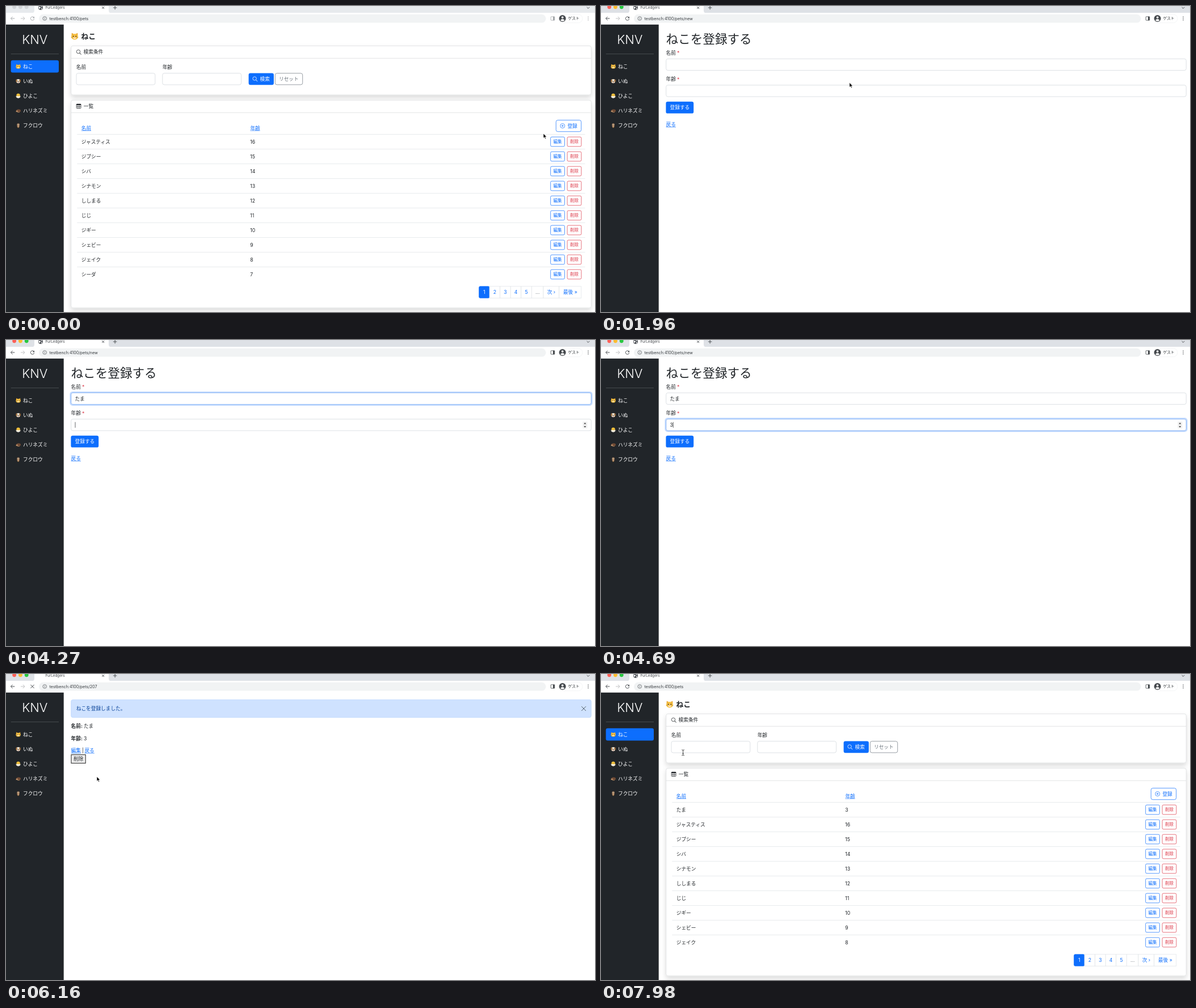
An HTML page that plays this animation: 1038 by 540 pixels, repeating every 8 s.

```html
<!DOCTYPE html>
<html lang="ja">
<head>
<meta charset="utf-8">
<title>Pet list</title>
<style>
html, body { margin: 0; width: 100%; height: 100%; overflow: hidden; background: #fff; }
svg { display: block; width: 1038px; height: 540px; }
text { font-family: Inter, "Noto Sans CJK JP", "Noto Sans CJK", sans-serif; white-space: pre; }
</style>
</head>
<body>
<svg id="stage" viewBox="0 0 1038 540"></svg>
<script>
const BLUE = '#0d6efd', RED = '#dc3545', INK = '#212529', GREY = '#6c757d';
const HOST = 'testbench:4100/pets';
const LOOP = 8000, STEP = 70, FONT = 8.67;

// Drawing helpers; text is placed by its left edge and vertical centre.
const text = (x, cy, s, { size = FONT, fill = INK, weight = 400, anchor = 'start', more = '' } = {}) =>
  `<text x="${x}" y="${cy + size * 0.37}" font-size="${size}" fill="${fill}" font-weight="${weight}" text-anchor="${anchor}" ${more}>${s}</text>`;
const rect = (x, y, w, h, fill = 'none', stroke = 'none', r = 0, more = '') =>
  `<rect x="${x}" y="${y}" width="${w}" height="${h}" fill="${fill}" stroke="${stroke}" rx="${r}" ${more}/>`;
const line = (d, stroke, width = 1, more = '') =>
  `<path d="${d}" fill="none" stroke="${stroke}" stroke-width="${width}" ${more}/>`;
const dot = (x, y, r, fill, more = '') => `<circle cx="${x}" cy="${y}" r="${r}" fill="${fill}" ${more}/>`;
const group = (id, body) => `<g id="${id}">${body}</g>`;
const at = (x, y, scale, body) => `<g transform="translate(${x} ${y}) scale(${scale})">${body}</g>`;
const link = (x, cy, s) => text(x, cy, s, { fill: BLUE }) +
  line(`M${x} ${cy + 4.6}h${s.length * FONT}`, BLUE, 0.7);
const field = (x, y, w) => rect(x, y, w, 20.4, '#fff', '#ced4da', 3.2, 'stroke-width=".7"');
const ring = (id, x, y, w, h, alpha) => group(id,
  rect(x - 1.1, y - 1.1, w + 2.2, h + 2.2, 'none', BLUE, 4, `stroke-width="2.2" stroke-opacity="${alpha}"`));
const fieldRing = (id, y) => group(id,
  rect(114.7, y, 916.6, 20.4, 'none', '#86b7fe', 3.2, 'stroke-width=".8"') +
  rect(113.4, y - 1.3, 919.2, 23, 'none', BLUE, 4, 'stroke-width="2" stroke-opacity=".25"'));

// Small animals, drawn around the origin about ten units wide.
const eyes = (x, y, r = 0.6) => dot(-x, y, r, '#3a2a1c') + dot(x, y, r, '#3a2a1c');
const cat =
  '<path d="M-4.6 0L-4.3-5L-1.5-3.3H1.5L4.3-5L4.6 0Z" fill="#e9a52c"/>' +
  '<ellipse cy=".7" rx="5" ry="4.2" fill="#f8c244"/>' + eyes(2, 0, 0.75) +
  '<ellipse cy="2.4" rx="2" ry="1.4" fill="#fff0c8"/>' + dot(0, 1.7, 0.6, '#d9776a') +
  line('M-5.3 1.6l2 .4M5.3 1.6l-2 .4', '#7d6030', 0.4);
const dog =
  '<ellipse rx="4.3" ry="4.5" fill="#f3ead9"/>' +
  '<ellipse cx="-3.7" cy="-.8" rx="1.4" ry="3.2" fill="#a5713d"/><ellipse cx="3.7" cy="-.8" rx="1.4" ry="3.2" fill="#a5713d"/>' +
  eyes(1.7, -0.6, 0.7) + '<ellipse cy="1.4" rx="1.2" ry=".9" fill="#33261e"/>' + dot(0, 3, 0.8, '#d9655c');
const chick =
  '<circle cy="-1" r="3.9" fill="#fbca3d"/><path d="M-5 0l1.6 1.2L-1.7 0L0 1.2L1.7 0L3.4 1.2L5 0Q5 5 0 5T-5 0Z" fill="#f3eee0"/>' +
  eyes(1.6, -1.8) + '<path d="M-1-.9H1L0 .3Z" fill="#ee8429"/>';
const hedgehog =
  '<ellipse cx=".6" cy=".3" rx="4.8" ry="3.3" fill="#6f4b35"/><ellipse cx="-3" cy="1.4" rx="2.2" ry="1.6" fill="#c99b72"/>' +
  dot(-4.9, 1.4, 0.6, '#1c1513') + dot(-3, 0.9, 0.4, '#1c1513') + line('M-2 3.6h5', '#c99b72', 0.8);
const owl =
  '<ellipse rx="3" ry="4.8" fill="#7b5a43"/><ellipse cy="1.6" rx="1.8" ry="2.6" fill="#bf9b79"/>' +
  dot(-1.2, -2, 1.1, '#ead9bd') + dot(1.2, -2, 1.1, '#ead9bd') + eyes(1.2, -2, 0.5) +
  '<path d="M-.5-1.2h1L0 0Z" fill="#e3a13a"/>' + line('M-1.5 4.8h3', '#d69a46', 0.7);

const searchIcon = (x, y, color) =>
  line(`M${x + 1.7} ${y + 1.6}l2.7 2.7`, color, 1) +
  `<circle cx="${x - 0.7}" cy="${y - 0.8}" r="3.2" fill="none" stroke="${color}" stroke-width=".75"/>`;
const plusIcon = color =>
  `<circle cx="980.8" cy="211.5" r="4" fill="none" stroke="${color}" stroke-width=".7"/>` +
  line('M978.8 211.5h4M980.8 209.5v4', color, 0.7);

function browser() {
  const lights = colors => colors.map((c, i) => dot(14.6 + i * 10.8, 1.8, 3.4, c)).join('');
  const nav = color => line('M15.3 22h-6.8M11.6 18.8l-3.2 3.2l3.2 3.2', color, 0.95) +
    rect(960.2, 18.8, 6.6, 6.4, 'none', color, 0.6, 'stroke-width=".8"') + rect(964, 18.8, 2.8, 6.4, color) +
    [19.2, 22, 24.8].map(y => dot(1026, y, 0.75, color)).join('');
  const reload = color => line('M49.3 20.4a3.2 3.2 0 1 0 .4 2.4', color, 0.95) +
    `<path d="M50 18.4v3.1h-3.1Z" fill="${color}"/>`;
  return rect(0, 0, 1038, 13, '#dee1e6') +
    group('idle', rect(0, 0, 1038, 13, '#e7eaed') + lights(['#d2d4d7', '#d2d4d7', '#d2d4d7'])) +
    group('awake', lights(['#fe5f57', '#febc2e', '#28c840'])) +
    '<path d="M46 12.5Q50 12 50 8V0H181V8Q181 12 185 12.5Z" fill="#fff"/>' + rect(0, 12, 1038, 20.5, '#fff') +
    group('favicon', dot(61, 3, 4, '#4b4f54') +
      '<path d="M58 1.2l2.2.2 1 1.3-1.6 1.2-.3 2L57.7 3.6ZM62 0l2 1.7-1.2.6-1.2-1ZM62.2 3.8l2 .2-1.2 2.1-1 .2Z" fill="#fff"/>') +
    text(69.5, 3, 'FurLedgers', { size: 6.3, fill: '#45494d' }) +
    line('M169.3 1.2l3.8 3.8M173.1 1.2l-3.8 3.8', '#45494d', 0.9) +
    line('M188.8 3h6.6M192.1 -.3v6.6', '#45494d', 0.95) +
    line('M1023.6 2l2.4 2.4l2.4-2.4', '#45494d', 0.95) +
    rect(58, 14.8, 893.5, 14.8, '#f1f3f4', 'none', 7.4) +
    line('M26 22h6.8M29.8 18.8l3.2 3.2l-3.2 3.2', '#babcbe', 0.9) +
    group('navIdle', nav('#a4a7aa') + reload('#a4a7aa')) + group('navAwake', nav('#45494d')) +
    group('reload', reload('#45494d')) +
    group('stop', line('M43.4 18.9l6.2 6.2M49.6 18.9l-6.2 6.2', '#45494d', 1)) +
    '<circle cx="68.2" cy="22" r="3.3" fill="none" stroke="#55595d" stroke-width=".75"/>' +
    line('M68.2 21.6v2.1M68.2 20v.8', '#55595d', 0.8) +
    text(76.5, 22, '', { size: 7.1, fill: '#33373b', more: 'id="url"' }) +
    rect(973.5, 14.8, 42.5, 14.8, '#fff', '#eceef0', 7.4, 'stroke-width=".6"') +
    dot(980.7, 22, 6, '#45494d') + dot(980.7, 20.1, 1.9, '#fff') +
    '<path d="M976.9 25.2q3.8-4.2 7.6 0q-3.8 3-7.6 0Z" fill="#fff"/>' +
    text(990.5, 22, 'ゲスト', { size: 6.7, fill: '#33373b' });
}

function sidebar() {
  const items = [[cat, 'ねこ'], [dog, 'いぬ'], [chick, 'ひよこ'], [hedgehog, 'ハリネズミ'], [owl, 'フクロウ']];
  return rect(0, 32.5, 101.7, 507.5, INK) +
    text(50.7, 59, 'KNV', { size: 21.7, fill: '#fff', weight: 300, anchor: 'middle' }) +
    line('M8.7 84.6H93', '#585c60', 0.7) +
    group('current', rect(8.6, 95.8, 84.4, 21.7, BLUE, 'none', 3.2)) +
    items.map(([art, name], i) => at(21.6, 106.6 + i * 26, 0.82, art) +
      text(30, 106.4 + i * 26, name, { fill: '#fff', weight: 500 })).join('');
}

const CATS = ['ジャスティス', 'ジプシー', 'シバ', 'シナモン', 'ししまる', 'じじ', 'ジギー', 'シェビー', 'ジェイク', 'シーダ']
  .map((name, i) => [name, 16 - i]);
const rows = list => list.map(([name, age], i) =>
  text(132.8, 239.5 + i * 26, name) + text(430.3, 239.5 + i * 26, age)).join('');

function listPage() {
  const card = (y, h, head) =>
    rect(114.7, y, 916.6, h, '#fff', '#d6d8da', 3.4, 'stroke-width=".7" filter="url(#shadow)"') +
    line(`M114.7 ${y + 22}h916.6`, '#d6d8da', 0.7) + head;
  const small = (x, y, s, color) => rect(x, y - 8.4, 24.8, 16.8, '#fff', color, 2.2, 'stroke-width=".7"') +
    text(x + 12.4, y, s, { size: 7.6, fill: color, anchor: 'middle' });
  const addButton = color => plusIcon(color) + text(989.4, 211.5, '登録', { fill: color, weight: 500 });

  const table = rect(124.2, 173, 7.8, 7.6, 'none', INK, 0.8, 'stroke-width=".75"') +
    rect(124.2, 173, 7.8, 2, INK) + line('M124.2 177.6h7.8M126.8 174v6.6M129.4 174v6.6', INK, 0.65);
  const lines = CATS.map((_, i) => line(`M125.3 ${226.5 + i * 26}H1020.5`, '#dee2e6', 0.7) +
    small(959.7, 239.5 + i * 26, '編集', BLUE) + small(989.1, 239.5 + i * 26, '削除', RED)).join('');

  const edges = [833.6, 852, 870.6, 889.2, 907.8, 926.3, 947, 974.8, 1013.8];
  const pages = ['1', '2', '3', '4', '5', '…', '次 ›', '最後 »'].map((s, i) => {
    const x = edges[i], w = edges[i + 1] - x, on = i === 0;
    return rect(x, 494.8, w, 20.5, on ? BLUE : '#fff', on ? BLUE : '#dee2e6', on ? 2 : 0, 'stroke-width=".7"') +
      text(x + w / 2, 505, s, { fill: on ? '#fff' : i === 5 ? GREY : BLUE, anchor: 'middle' });
  }).join('');

  return at(121, 53.5, 1.2, cat) + text(132.3, 53, 'ねこ', { size: 13, weight: 600 }) +
    card(70.3, 86.6, searchIcon(128.2, 81.4, INK) + text(136.6, 81.2, '検索条件')) +
    text(123.8, 107.5, '名前') + text(275.7, 107.5, '年齢') + field(124, 118.6, 138.8) + field(275.8, 118.6, 138.8) +
    rect(427.6, 118.4, 44.3, 20.8, BLUE, 'none', 3.2) + searchIcon(438.8, 128.8, '#fff') +
    text(447.6, 128.8, '検索', { fill: '#fff', weight: 500 }) +
    rect(474.3, 118.7, 48.4, 20.2, '#fff', GREY, 3.2, 'stroke-width=".7"') + text(481, 128.8, 'リセット', { fill: GREY }) +
    card(166.2, 366.6, table + text(136.8, 177.2, '一覧')) +
    link(132.8, 215.3, '名前') + link(430.4, 215.3, '年齢') +
    rect(969.3, 201.4, 44.4, 20.3, '#fff', BLUE, 3.2, 'stroke-width=".7"') + addButton(BLUE) +
    group('addHover', rect(969, 201.1, 45, 20.9, BLUE, 'none', 3.2) + addButton('#fff')) +
    ring('addRing', 969, 201.1, 45, 20.9, 0.5) +
    lines + group('rowsOld', rows(CATS)) + group('rowsNew', rows([['たま', 3], ...CATS.slice(0, 9)])) + pages;
}

function formPage() {
  const label = (y, s) => text(114.6, y, s) + text(134, y + 0.5, '*', { fill: RED });
  return text(114.5, 58.3, 'ねこを登録する', { size: 21.6 }) +
    label(82.4, '名前') + field(114.7, 93.2, 916.6) + fieldRing('nameRing', 93.2) + label(128.8, '年齢') +
    field(114.7, 139.6, 916.6) + fieldRing('ageRing', 139.6) +
    text(121.6, 103.4, '', { more: 'id="name"' }) + text(121.6, 149.8, '3', { more: 'id="age"' }) +
    group('compose', line('M121.8 108.4h17', INK, 0.7)) +
    group('spinner', rect(1016.4, 144.2, 8, 11.6, '#efefef') +
      '<path d="M1018.3 148.2h4l-2-2.4ZM1018.3 152h4l-2 2.4Z" fill="#444"/>') +
    line('M0 -5v10', INK, 0.7, 'id="caret"') +
    group('suggest', rect(116.5, 114, 69, 39, '#f6f6f6', '#c6c6c6', 3, 'stroke-width=".6"') +
      group('pick', rect(117.5, 116.5, 67, 16.5, '#1d66d6', 'none', 2)) +
      text(121.6, 125, 'たま', { more: 'id="first"' }) + text(121.6, 143, '玉')) +
    rect(114.4, 168.8, 48.8, 20.8, BLUE, 'none', 3.2) +
    group('saveHover', rect(114.4, 168.8, 48.8, 20.8, '#0b5ed7', 'none', 3.2)) + ring('saveRing', 114.4, 168.8, 48.8, 20.8, 0.5) +
    text(121.6, 179.1, '登録する', { fill: '#fff', weight: 500 }) + link(114.6, 209, '戻る');
}

const detailPage = () =>
  rect(114.7, 45.4, 916.6, 31.3, '#cfe2ff', '#b6d4fe', 3.2, 'stroke-width=".7"') +
  text(123.8, 61, 'ねこを登録しました。', { fill: '#084298' }) +
  line('M1014.2 57.2l7.8 7.8M1022 57.2l-7.8 7.8', '#53606f', 1) +
  text(114.6, 92, '名前:', { weight: 700 }) + text(137, 92, 'たま') +
  text(114.6, 113.8, '年齢:', { weight: 700 }) + text(137, 113.8, '3') +
  link(114.6, 135.2, '編集') + text(134, 135.2, '|') + link(138.4, 135.2, '戻る') +
  rect(115, 142.4, 25.2, 15, '#efefef', '#333', 0, 'stroke-width="1.1"') + text(119, 149.9, '削除');

const cursors =
  group('arrow', '<path d="M0 0V8.2L1.9 6.5L3.2 9.5L4.6 8.9L3.3 6H5.8Z" fill="#000" stroke="#fff" stroke-width=".7"/>') +
  group('beam', line('M-2.3 -5Q0 -5 0 -3.8Q0 -5 2.3 -5M0 -4V4M-2.3 5Q0 5 0 3.8Q0 5 2.3 5M-1.2 1.6h2.4', '#222', 0.8)) +
  group('hand', '<path d="M-1 1q0-1.2 .9-1.2t.9 1.2v3l4 .9q.9.3.7 1.4l-.8 4.3h-5.2l-3-4.1q-.5-1 .6-1.2l1.9 1.3Z" fill="#fff" stroke="#000" stroke-width=".7"/>');

document.getElementById('stage').innerHTML =
  '<defs><filter id="shadow" x="-5%" y="-10%" width="110%" height="130%">' +
  '<feDropShadow dx="0" dy="4.3" stdDeviation="4.3" flood-opacity=".15"/></filter></defs>' +
  group('list', listPage()) + group('form', formPage()) + group('detail', detailPage()) +
  sidebar() + browser() + group('pointer', cursors);

const el = {};
document.querySelectorAll('#stage [id]').forEach(e => { el[e.id] = e; });
const show = (id, on) => el[id].setAttribute('opacity', +on);
const write = (id, s) => { if (el[id].textContent !== s) el[id].textContent = s; };
const within = (t, a, b) => t >= a && t < b;
const ramp = (t, a, b) => Math.min(1, Math.max(0, (t - a) / (b - a)));
const smooth = u => u * u * (3 - 2 * u);

// Pointer stops: time, x, y.
const PATH = [
  [0, 947, 225], [420, 984, 217], [490, 984, 217], [840, 989, 212], [1470, 989, 212],
  [2170, 286, 114], [2240, 286, 114], [2520, 286, 109], [5110, 286, 109], [5460, 190, 189],
  [5670, 165, 184], [5810, 160, 181], [6720, 160, 181], [7350, 145.7, 147], [7490, 144, 133],
  [7560, 144.6, 137], [7770, 144.6, 137], [7840, 144.6, 138.8], [8000, 144.6, 138.8]
];
// What is typed from each time on.
const TYPED = [[0, ''], [3220, 't'], [3290, 'た'], [3430, 'たm'], [3500, 'たま']];

function pointer(t) {
  const i = PATH.findIndex(p => p[0] > t);
  const [t0, x0, y0] = PATH[i - 1], [t1, x1, y1] = PATH[i];
  const u = smooth(ramp(t, t0, t1));
  el.pointer.setAttribute('transform', `translate(${x0 + (x1 - x0) * u} ${y0 + (y1 - y0) * u})`);
  const hidden = within(t, 3220, 5180);
  const beam = within(t, 2100, 3220) || within(t, 5180, 5320) || t >= 7840;
  const hand = within(t, 7420, 7840);
  show('beam', beam);
  show('hand', hand);
  show('arrow', !hidden && !beam && !hand);
}

function form(t) {
  const typed = TYPED.filter(s => s[0] <= t).pop()[1];
  write('name', typed);
  show('compose', within(t, 3220, 3920));
  el.compose.firstChild.setAttribute('d', `M121.8 108.4h${typed.length * FONT - 0.5}`);
  show('suggest', within(t, 3500, 3920));
  show('pick', t >= 3640);
  el.first.setAttribute('fill', t >= 3640 ? '#fff' : INK);
  show('age', t >= 4690);
  show('spinner', t >= 4270);
  show('nameRing', ramp(t, 2240, 2450) * (1 - ramp(t, 4270, 4410)));
  show('ageRing', ramp(t, 4270, 4410) * (1 - ramp(t, 5810, 5950)));
  show('saveHover', ramp(t, 5670, 5810));
  show('saveRing', ramp(t, 5810, 5950));
  const inAge = t >= 4270;
  const x = inAge ? (t < 4690 ? 122 : 127.3) : 121.9 + typed.length * FONT;
  el.caret.setAttribute('transform', `translate(${x} ${inAge ? 149.8 : 103.4})`);
  show('caret', within(t, 2310, 2800) || within(t, 3220, 5180));
}

function draw(time) {
  const t = Math.floor(time / STEP) * STEP;
  const page = t < 1470 || t >= 7840 ? 'list' : t < 6160 ? 'form' : 'detail';
  for (const id of ['list', 'form', 'detail']) el[id].style.display = id === page ? '' : 'none';
  show('current', page === 'list');
  show('rowsOld', t < 7840);
  show('rowsNew', t >= 7840);

  const awake = t >= 560;
  const loading = within(t, 1260, 1540) || within(t, 6020, 6230) || within(t, 7700, 7910);
  show('idle', !awake);
  show('navIdle', !awake);
  show('awake', awake);
  show('navAwake', awake);
  show('reload', awake && !loading);
  show('stop', loading);
  show('favicon', !loading);
  write('url', HOST + (t < 1260 || t >= 7700 ? '' : t < 6090 ? '/new' : '/207'));

  show('addHover', within(t, 560, 7700) ? ramp(t, 560, 770) : 0);
  show('addRing', within(t, 1120, 7700) ? ramp(t, 1120, 1330) : 0);
  form(t);
  pointer(t);
}

const start = performance.now();
function tick() {
  draw((performance.now() - start) % LOOP);
  requestAnimationFrame(tick);
}
tick();
</script>
</body>
</html>
```
